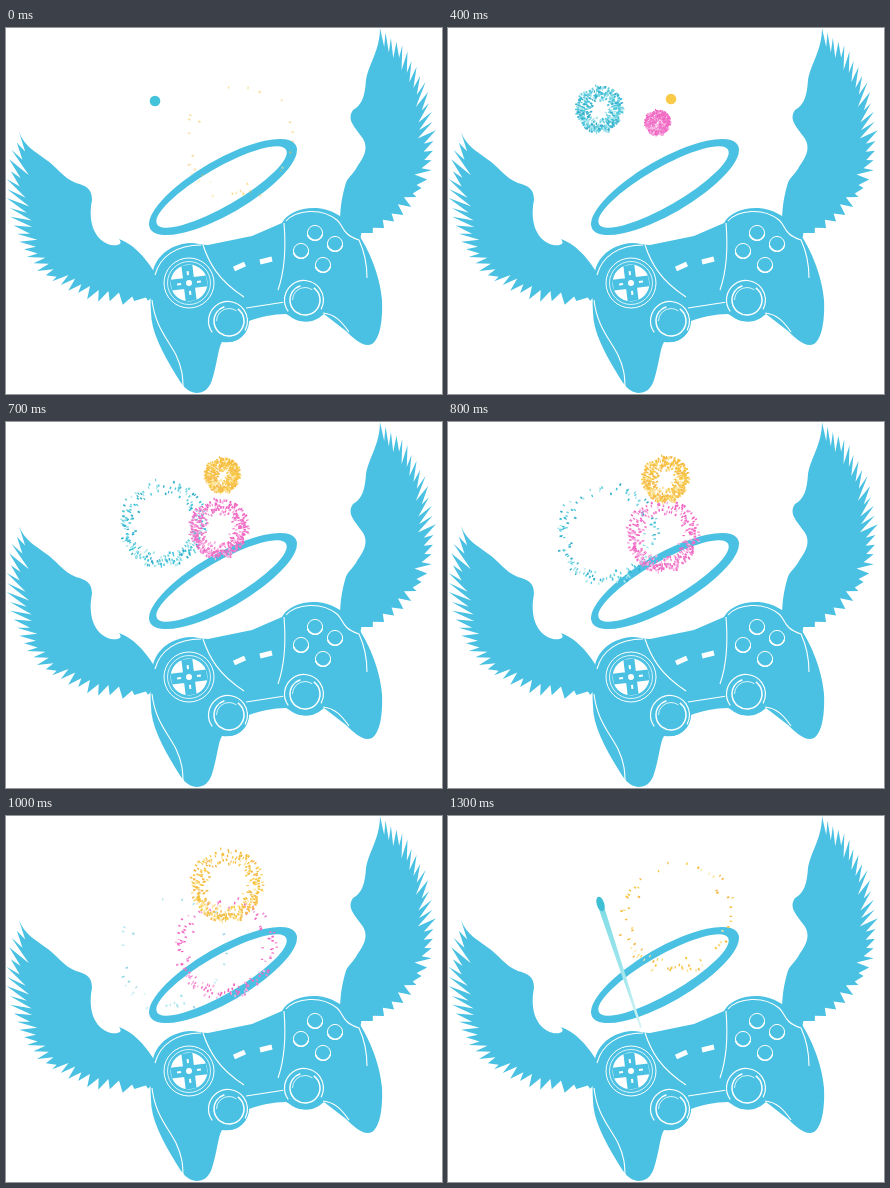
These frames come from a looping animation (436x366 px, 1400 ms). An HTML page with a canvas:

```html
<!DOCTYPE html>
<html lang="en">
<head>
<meta charset="utf-8">
<title>Winged controller</title>
<style>
html, body { margin: 0; width: 100%; height: 100%; overflow: hidden; background: #fff; }
canvas { display: block; }
</style>
</head>
<body>
<canvas id="stage" width="436" height="366"></canvas>
<script>
const ctx = document.getElementById('stage').getContext('2d');
const BLUE = '#4ac1e2', TAU = Math.PI * 2, STEP = 100, STEPS = 14;

const still = document.createElement('canvas');
still.width = 436;
still.height = 366;
const art = still.getContext('2d');

const mix = (a, b, k) => a + (b - a) * k;
const rand = (i, k) => {
  const v = Math.sin(i * 12.9898 + k * 78.233) * 43758.5453;
  return v - Math.floor(v);
};

function fill(d, color = BLUE) {
  art.fillStyle = color;
  art.fill(new Path2D(d));
}
function line(d, width = 1.1, color = '#fff') {
  art.strokeStyle = color;
  art.lineWidth = width;
  art.stroke(new Path2D(d));
}
function disc(x, y, r, color) {
  art.fillStyle = color;
  art.beginPath();
  art.arc(x, y, r, 0, TAU);
  art.fill();
}
function arc(x, y, r, width, from = 0, to = 1) {
  art.strokeStyle = '#fff';
  art.lineWidth = width;
  art.beginPath();
  art.arc(x, y, r, from * TAU, to * TAU);
  art.stroke();
}

const bezier = (p, t) => {
  const u = 1 - t;
  return [0, 1].map(k => u ** 3 * p[0][k] + 3 * u * u * t * p[1][k] + 3 * u * t * t * p[2][k] + t ** 3 * p[3][k]);
};

// `lead` runs from the root to the wing tip; feathers follow `rim` back,
// each one swept towards the wing tip.
function wing(lead, rim, [cx, cy], seed) {
  const count = 27;
  let d = lead;
  for (let i = 1; i <= count; i++) {
    const t = i / count, [x, y] = bezier(rim, t);
    const far = Math.hypot(cx - x, cy - y);
    const depth = mix(23, 9, t) * mix(0.5, 1.2, rand(i, seed)) / far;
    const poke = 5 * (rand(i, seed + 1) - 0.5) / far;
    d += `L${mix(x, cx, depth)} ${mix(y, cy, depth)}L${mix(x, cx, poke)} ${mix(y, cy, poke)}`;
  }
  fill(d + 'Z');
}

function drawWings() {
  wing('M147 268V242C138 228 127 216 113 211C117 216 113 218 105 217C87 212 82 192 86 172C86 160 80 158 70 155C57 150 50 138 39 131C29 123 19 119 13 104',
    [[13, 104], [-18, 190], [15, 285], [143, 274]], [95, 205], 5);
  wing('M354 213L334 197C334 184 335 172 339 158C341 149 347 147 351 139C358 129 364 119 355 108C347 97 341 91 347 82C356 77 359 68 360 52C363 35 374 22 374 0',
    [[374, 0], [425, 25], [475, 165], [354, 213]], [368, 130], 9);
}

function drawHalo() {
  art.beginPath();
  art.ellipse(217, 159, 84, 27, -Math.PI / 6, 0, TAU);
  art.ellipse(215.5, 159, 74.5, 19, -Math.PI / 6, 0, TAU);
  art.fillStyle = BLUE;
  art.fill('evenodd');
}

function drawPad() {
  fill('M147 243C151 226 167 216 184 215C190 215 196 217 202 217L246 208L276 195C281 185 296 179 311 180C325 181 338 189 347 199C361 216 374 246 376 272C377 292 374 311 366 316C358 320 348 311 340 303L318 286C310 293 303 295 294 293C288 292 284 288 280 286C267 286 254 289 243 293C241 307 232 316 216 314C212 320 211 337 206 352C203 361 198 365 190 365C181 364 176 357 170 347C156 324 145 303 145 284C144 268 145 255 147 243Z');

  // Grip, shoulder and panel seams
  line('M146 272C149 298 161 310 170 327C176 340 177 348 177 361');
  line('M149 247C154 228 171 217 195 217');
  line('M197 217C203 235 212 252 238 269');
  line('M278 195C280 219 279 242 272 262');
  line('M280 193C290 182 315 179 331 192C338 198 335 206 353 212C359 225 361 238 361 250');
  line('M240 280L279 274');
  line('M317 285C329 286 336 294 343 304');
  line('M228 241L239 236M254 234L266 231', 5);

  // Direction pad
  arc(183, 255, 25, 1);
  arc(183, 255, 21.5, 0.8);
  disc(183, 255, 18.5, '#fff');
  art.save();
  art.translate(183, 255);
  art.rotate(-0.12);
  line('M-18 0H18M0 -18V18', 11, BLUE);
  line('M-12 0H-8M8 0H12M0 -12V-8M0 8V12', 2);
  art.restore();
  disc(183, 255, 3, '#fff');

  for (const [x, y] of [[309, 205], [329, 216], [295, 223], [317, 237]]) {
    arc(x, y, 7.6, 1);
    arc(x, y - 0.6, 7.8, 1.6, 0.05, 0.45);
  }
  for (const [x, y] of [[222, 293], [298, 272]]) {
    disc(x, y, 21, BLUE);
    arc(x, y, 19.5, 1.2, 0.4, 1.08);
    arc(x + 1, y, 15, 1.5, -0.15, 0.7);
    arc(x + 1, y, 12.5, 0.8, 0.5, 0.85);
  }
}

const bursts = [
  { at: 0, x: 149, y: 73, sx: 149, sy: 73, tones: ['#43c3d9', '#6ed2df', '#a9e6ed', '#35afcc'] },
  { at: 2, x: 209, y: 93, sx: 209, sy: 93, tones: ['#f36bc6', '#f067c1', '#f8b4e2', '#ee82ce'] },
  { at: 4, x: 215, y: 49, sx: 223, sy: 71, tones: ['#f9cb48', '#f5c040', '#fce5a0', '#f4b94c'] }
];
const SPARKS = 500, LIFE = 11;

function drawBurst({ x, y, sx, sy, tones }, age) {
  if (age === 0) {
    ctx.fillStyle = tones[0];
    ctx.beginPath();
    ctx.arc(sx, sy, 5.3, 0, TAU);
    ctx.fill();
    return;
  }
  const cx = x + 0.16 * age * age, cy = y + 0.4 * age ** 2.2;
  const radius = Math.min(5 + 4.2 * age + 0.25 * age * age, 64);
  const hollow = Math.min(0.1 * age - 0.05, 0.74);
  const alive = 1 / (1 + Math.exp((age - 7) * 0.8));
  const dash = Math.min(1 + age * 0.5, 2.5);
  ctx.globalAlpha = Math.min(1, (LIFE - age) / 2);
  for (let i = 0; i < SPARKS; i++) {
    const angle = i * 2.39996, c = Math.cos(angle), s = Math.sin(angle);
    if (rand(i, 1) > alive * (1 + 0.07 * age * s)) continue;
    const r = radius * mix(0.88, 1, rand(i, 4)) * mix(hollow, 1, Math.sqrt(rand(i, 2)));
    const inner = Math.max(0, r - dash);
    ctx.lineWidth = mix(1, 2, rand(i, 5));
    ctx.strokeStyle = tones[Math.floor(rand(i, 3) * 4)];
    ctx.beginPath();
    ctx.moveTo(cx + c * inner, cy + s * inner);
    ctx.lineTo(cx + c * r, cy + s * r);
    ctx.stroke();
  }
  ctx.globalAlpha = 1;
}

function drawRocket(k) {
  const x = mix(193, 152.5, k), y = mix(212, 87, k);
  const fade = ctx.createLinearGradient(x, y, 193, 212);
  fade.addColorStop(0, '#7ddce5');
  fade.addColorStop(0.6, '#a5e7ed');
  fade.addColorStop(1, '#d8f5f7');
  ctx.fillStyle = fade;
  ctx.fill(new Path2D(`M${x - 2} ${y + 5}H${x + 4}L194 212H192Z`));
  ctx.fillStyle = '#3fbfd3';
  ctx.beginPath();
  ctx.ellipse(x, y + 1, 3.8, 7.5, -0.3, 0, TAU);
  ctx.fill();
}

function frame(now) {
  const step = Math.floor(now / STEP) % STEPS;
  ctx.fillStyle = '#fff';
  ctx.fillRect(0, 0, 436, 366);
  ctx.drawImage(still, 0, 0);
  for (const burst of bursts) {
    const age = (step - burst.at + STEPS) % STEPS;
    if (age < LIFE) drawBurst(burst, age);
  }
  if (step > 11) drawRocket(((step - 11) / 2) ** 0.7);
  requestAnimationFrame(frame);
}

drawWings();
drawHalo();
drawPad();
requestAnimationFrame(frame);
</script>
</body>
</html>
```
